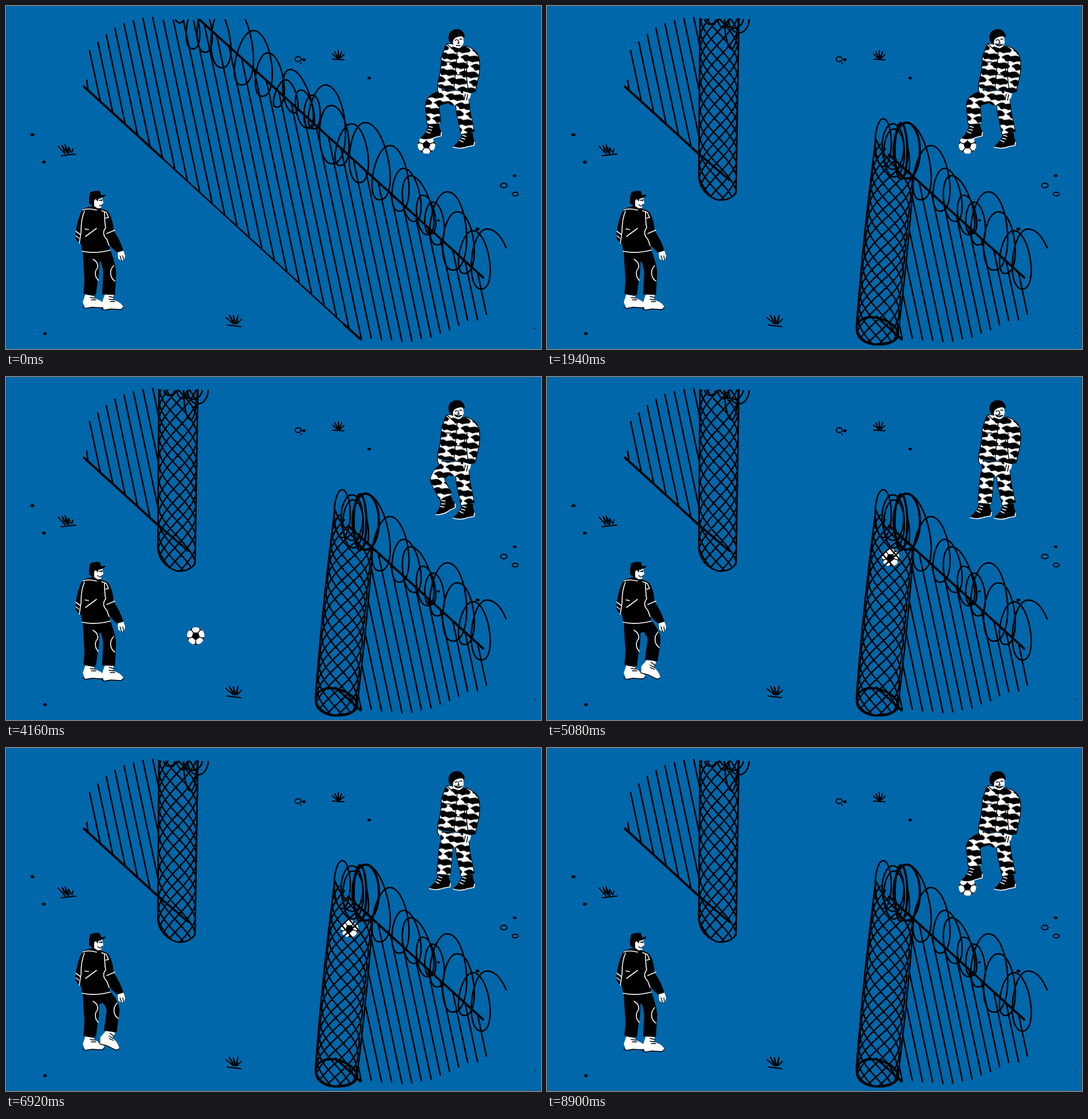
An HTML page that plays this animation: 934 by 600 pixels, repeating every 9.4 s.

```html
<!DOCTYPE html>
<html>
<head>
<meta charset="utf-8">
<style>
html, body { margin: 0; height: 100%; overflow: hidden; background: #0067aa }
svg { display: block; width: 934px; height: 600px; stroke-linecap: round; stroke-linejoin: round }
.l { fill: none; stroke: #000; stroke-width: 2.6 }
.b { fill: none; stroke: #000; stroke-width: 3.8 }
.w { fill: none; stroke: #fff; stroke-width: 1.6 }
.t { fill: none; stroke: #000; stroke-width: 1.4 }
.g { fill: none; stroke: #000; stroke-width: 1.9 }
.W { fill: #fff }
</style>
</head>
<body>
<svg id="stage" viewBox="0 0 934 600"></svg>
<script>
const LOOP = 9400, KICK_START = 2040, KICK_GAP = 920;
const path = (d, cls = 'l') => `<path class="${cls}" d="${d}"/>`;
const oval = (x, y, rx, ry, cls = '') => `<ellipse class="${cls}" cx="${x}" cy="${y}" rx="${rx}" ry="${ry}"/>`;
const group = (s, attr = '') => `<g ${attr}>${s}</g>`;
const move = (x, y, a = 0) => `transform="translate(${x} ${y}) rotate(${a})"`;
const clip = (id, d) => `<clipPath id="${id}"><path d="${d}"/></clipPath>`;

// Fence
function pickets() {
  const tops = [78, 63, 50, 39, 31, 26, 22, 20];
  const ends = [581, 584, 584, 587, 586, 582, 579, 572, 566, 558, 550, 549, 539];
  let d = '';
  for (let i = 0; i < 35; i++) {
    const c = 129.4 + 17.5 * i, at = y => c + .212 * y;
    const railY = 24 + ((c - 60.2) / .807 - 338) * .911;
    const top = tops[i] ?? Math.max(25, railY);
    const bottom = i < 22 ? 164.5 + 19.85 * i : ends[i - 22];
    d += `M${at(top)} ${top}L${at(bottom)} ${bottom}`;
  }
  return path(d);
}

// Each row: crest x, y, then the low point x, y of one turn of wire
const turns = [
  [312, -10, 326, 75], [336, 0, 348, 81], [356, -5, 377, 108], [388, -6, 411, 138],
  [432, 43, 447, 158], [457, 82, 472, 177], [488, 129, 503, 187], [496, 111, 525, 213],
  [515, 147, 530, 214], [535, 156, 537, 215], [557, 138, 569, 276], [568, 174, 583, 279],
  [603, 206, 617, 309], [627, 204, 652, 339], [670, 244, 686, 359], [694, 284, 712, 377],
  [706, 297, 735, 400], [728, 331, 741, 399], [745, 343, 753, 418], [770, 325, 780, 462],
  [788, 360, 800, 468], [815, 393, 830, 495]
];
function wire() {
  let d = 'M296 24Q302 34 310 26M312 -10';
  turns.forEach(([x, y, u, v], i) => {
    const [nx, ny] = turns[i + 1] || [840, 390];
    const k = .28 * (v - y), m = .28 * (v - ny);
    d += `C${x + k} ${y} ${u + k} ${v} ${u} ${v}C${u - m} ${v} ${nx - m} ${ny} ${nx} ${ny}`;
  });
  return path(d + 'Q860 391 873 423');
}

const fence = pickets() + path('M136 141L619 583M141 130L143 146') +
  path('M136 141L274 267M590 557L619 583M338 24L833 475', 'b') + group(wire(), 'clip-path="url(#below)"');

// Wire mesh wound round a roll, slightly uneven
function mesh(center, r, y0, y1) {
  const count = 10, pitch = 230;
  let d = '';
  for (let n = 0; n < count; n++) {
    const phase = n / count + .02 * Math.sin(n * 7);
    for (let y = y0; y <= y1; y += 6)
      d += `${y === y0 ? 'M' : 'L'}${(center(y) + r * Math.sin((y / pitch + phase) * 2 * Math.PI)).toFixed(1)} ${y}`;
  }
  return path(d);
}
const leftEdge = 'M267 22L265 300Q268 328 297 339Q318 342 330 327L335 22';
const rightEdge = 'M574 232Q552 400 540 562Q545 588 575 592Q600 595 612 580Q632 420 640 296';
const leftRoll = group(mesh(y => 301 - .008 * y, 34, 16, 346), 'clip-path="url(#leftRoll)"') + path(leftEdge) +
  path('M255 250L318 304', 'b') +
  group(oval(335, 22, 18, 25, 'l') + oval(322, 20, 12, 55, 'l') + oval(308, 20, 10, 18, 'l') +
    oval(326, 20, 17, 19, 'l') + oval(285, 21, 10, 11, 'l'), 'clip-path="url(#below)"');
const rightRoll = group(mesh(y => 609 - (y - 235) * .1, 36, 220, 598), 'clip-path="url(#rightRoll)"') + path(rightEdge) +
  path('M597 260L645 304M575 543L619 583M541 568C538 536 585 540 606 560C626 584 600 590 575 592C557 592 542 582 541 568', 'b') +
  oval(587, 239, 14, 42, 'l') + oval(604, 246, 19, 40, 'l') + oval(606, 257, 18, 42, 'l') +
  oval(618, 254, 11, 49, 'b') + oval(628, 253, 23, 49, 'b');

function drawFence(open) {
  if (!open) return fence;
  const rest = 1 - open / 3, dx = 141 * rest, dy = 122 * rest;
  return `<defs>${clip('leftSide', `M0 0H${266 + dx}V600H0Z`)}` +
    clip('rightSide', `M${627 - dx} -200V${290 - dy}L${641 - dx} ${295 - dy}L${612 - dx} ${600 - dy}V600H934V-200Z`) + '</defs>' +
    group(fence, 'clip-path="url(#leftSide)"') + group(fence, 'clip-path="url(#rightSide)"') +
    group(leftRoll, move(dx, dy)) + group(rightRoll, move(-dx, -dy));
}

// Ground
const ground = [
  [46, 225, 3.6, 2.6], [66, 273, 3.3, 2.6], [68, 573, 3.2, 2.6], [634, 126, 3, 2.3], [888, 297, 3.2, 2.2],
  [755, 375, 2.4, 2], [823, 390, 3.6, 2.6], [923, 564, 1, 1], [520, 94, 3, 2.4], [515, 100, 1.5, 1.2]
].map(e => oval(...e)).join('') +
  oval(510, 93, 5.3, 4.2, 'g') + oval(869, 314, 5.8, 4, 'g') + oval(889, 329, 5.3, 3.2, 'g') +
  path('M91 245L103 259L98 244L107 258L103 243L110 258L109 247L115 257L117 250M96 262L122 259' +
    'M384 545L397 556L390 541L399 556L397 542L401 556L405 541L403 556L411 548M386 558L410 561' +
    'M570 84L579 92L574 80L580 92L580 78L581 92L586 80L582 92L590 85M570 93L590 94', 'g');

function ball(x, y, turn) {
  const corner = (r, a) => `${r * Math.sin(a)} ${-r * Math.cos(a)}`;
  let core = '', rim = '', seams = '';
  for (let i = 0; i < 5; i++) {
    const a = i * 2 * Math.PI / 5;
    core += (i ? 'L' : 'M') + corner(7.5, a);
    rim += `M${corner(16, a - .32)}L${corner(12.5, a)}L${corner(16, a + .32)}Z`;
    seams += `M${corner(7, a)}L${corner(13, a)}`;
  }
  return group(oval(0, 0, 15.3, 15.3, 'W') + group(path(core + 'Z', '') + path(rim, ''), 'clip-path="url(#ball)"') +
    path(seams, 't'), move(x, y, turn));
}

// Legs: knee x, y, ankle x, y, boot angle
const leftPoses = {
  stand: [181, 468, 179, 505, 0], ball: [200, 459, 188, 479, 6], back: [174, 468, 152, 492, 40],
  kick: [191, 464, 200, 497, -18], recover: [187, 460, 182, 496, 23]
};
const rightPoses = {
  stand: [767, 186, 764, 221, 0], ball: [744, 174, 747, 206, -4], back: [780, 187, 806, 209, -38],
  kick: [752, 181, 738, 211, 18], recover: [753, 181, 768, 210, -16]
};

const paleBoot = path('M-6 -2L9 -1L8 9Q20 12 26 21L24 25L-8 26L-12 16Z', 'W') +
  path('M-12 24L-8 27L4 25L22 26L26 22M1 3L9 5M1 8L9 9M3 12L11 12', 't');
const darkBoot = path('M-10 -2L9 0Q9 8 12 14L10 22L-8 26Q-22 28 -25 23Q-12 14 -10 -2Z', '') +
  path('M-25 25Q-12 29 0 24L11 22L12 16M-9 4L-3 6M-11 9L-5 11M-14 13L-8 16', 'w');

function strokeLeg(hip, [kx, ky, ax, ay], color, width) {
  return `<path d="M${hip}Q${kx} ${ky - 12} ${kx} ${ky}L${ax} ${ay}" fill="none" stroke="${color}" stroke-width="${width}" stroke-linecap="butt"/>`;
}

function rays(x, y, size) {
  if (!size) return '';
  let d = '';
  for (let i = 0; i < 9; i++) {
    const a = Math.PI * (1 + i / 8), c = Math.cos(a), s = Math.sin(a), r = 18 + size * 10;
    d += `M${x + r * c} ${y + r * s}L${x + (r + 11) * c} ${y + (r + 11) * s}`;
  }
  return path(d);
}

function leftMan(pose, happy) {
  const p = leftPoses[pose];
  return group(paleBoot, move(146, 502)) +
    path('M134 428L181 426L185 440L163 448Q163 470 160 482L157 505Q145 508 135 503Q138 480 136 465Z', '') +
    path('M152 443Q162 449 160 458Q154 464 157 474L161 480', 'w') +
    group(paleBoot, move(p[2], p[3], p[4])) + strokeLeg('172 432', p, '#000', 22.5) +
    group(path('M7 -14Q0 -7 2 3Q4 10 9 13', 'w'), move(p[0], p[1])) +
    path('M133 356Q144 350 153 350L164 354Q178 357 181 364Q187 377 188 393Q200 411 205 428L195 432Q186 425 181 418L182 427Q158 434 133 429L131 416Q120 410 121 400Q124 374 133 356Z', '') +
    path('M137 359Q131 372 131 395L128 415M134 357Q142 353 158 357M167 358L175 361L179 370L174 371M172 361Q172 378 174 388Q166 398 176 408L180 419M139 403L158 389M138 390L144 391M176 398L190 392M133 429Q156 434 182 427M122 394L130 400M122 402L127 406', 'w') +
    path('M195 431L205 428L208 437L206 444L202 446L196 442Z', 'W') + path('M199 437L202 446M204 437L205 444', 't') +
    path('M145 333L145 345L151 350L157 352L165 332Z', '') +
    path('M154 346Q153 338 157 338L160 342L162 336L168 335L170 345L167 347L166 353L160 354L154 350Z', 'W') +
    path('M145 337L147 326Q155 322 164 324L166 331L174 330L172 333L164 337Z', '') +
    path('M163 340L168 339M166 340L167 341' + (happy ? 'M160 347Q163 352 167 348' : 'M163 349L167 349'), 't');
}

function rightMan(pose, happy) {
  const p = rightPoses[pose], hip = '774 157', camo = 'url(#camo)', still = [798, 184, 806, 222];
  return group(darkBoot, move(806, 222)) + strokeLeg('793 152', still, '#000', 25) + strokeLeg('793 152', still, camo, 23) +
    group(darkBoot, move(p[2], p[3], p[4])) + strokeLeg(hip, p, '#000', 25) + strokeLeg(hip, p, camo, 23) +
    `<path fill="${camo}" d="M760 146L806 150L808 172L778 174L758 160Z"/>` +
    path('M754 138L760 142L761 150L756 153L753 147Z', 'W') + path('M754 138L753 147L756 153', 't') +
    `<path fill="${camo}" stroke="#000" stroke-width="1.3" d="M768 67Q779 63 790 73L804 70Q819 76 823 84Q829 95 826 120L819 150L806 152L800 149L757 143Q752 138 755 130Q760 110 760 90Z"/>` +
    path('M788 76L782 145M805 98Q802 126 808 150M789 104L801 104L800 121L787 120M764 98L777 98M770 67L784 79L790 73L801 79', 't') +
    path('M798 149L812 153L810 161L804 166L799 160Z', 'W') + path('M802 154L800 162M806 155L804 165', 't') +
    path('M780 54Q790 49 798 52L799 64Q796 73 790 74L781 71Z', 'W') +
    path('M773 60Q770 45 783 41Q797 38 801 52Q800 58 796 53Q788 53 783 57Q779 61 780 66Q774 64 773 60Z', '') +
    path('M784 60L787 59M792 58L796 58M789 59L791 65L788 65' + (happy ? 'M783 66Q788 73 796 67Q790 69 783 66' : 'M786 69L793 69'), 't');
}

const defs = '<defs>' + clip('below', 'M0 23H934V600H0Z') + clip('leftRoll', leftEdge + 'Z') + clip('rightRoll', rightEdge + 'Z') +
  '<clipPath id="ball"><circle r="15.3"/></clipPath>' +
  '<pattern id="camo" width="38" height="28" patternUnits="userSpaceOnUse" patternTransform="rotate(6)"><path class="W" d="M0 0H38V28H0Z"/>' +
  [[0, 0], [19, 14], [-19, 14]].map(([x, y]) =>
    group(path('M0 6L6 2Q12 -1 16 3L24 1Q30 0 36 6L34 10L28 11L22 13L16 11L9 13L6 9Z', ''), move(x, y))).join('') + '</pattern></defs>';

const kickerPoses = ['back', 'kick', 'kick', 'recover', 'recover', 'stand', 'stand'];
const receiverPoses = ['stand', 'stand', 'stand', 'stand', 'stand', 'recover', 'ball'];
const stage = document.getElementById('stage');
let lastKey;

function render(t) {
  const open = t < 1000 ? 0 : Math.min(3, Math.floor((t - 1000) / 70) + 1);
  const happy = t >= 1640;
  const shout = happy && t < 1940 ? Math.floor((t - 1640) / 100) + 1 : 0;
  const since = t - KICK_START;
  const leftKicks = since < 0 || Math.floor(since / KICK_GAP) % 2 === 1;
  const step = since < 0 ? 6 : Math.min(6, Math.floor(since % KICK_GAP / 70));
  const key = [open, happy, shout, leftKicks, step].join();
  if (key === lastKey) return;
  lastKey = key;

  const travel = Math.max(0, Math.min(1, (step - 1) / 4));
  const u = leftKicks ? travel : 1 - travel;
  const [leftPose, rightPose] = leftKicks
    ? [kickerPoses[step], receiverPoses[step]] : [receiverPoses[step], kickerPoses[step]];
  stage.innerHTML = defs + ground + ball(197 + 537 * u, 517 - 274 * u + 24 * u * (1 - u), u * 144) +
    leftMan(leftPose, happy) + rightMan(rightPose, happy) + rays(158, 338, shout) + rays(788, 57, shout) + drawFence(open);
}

function tick() {
  render(performance.now() % LOOP);
  requestAnimationFrame(tick);
}
tick();
</script>
</body>
</html>
```
